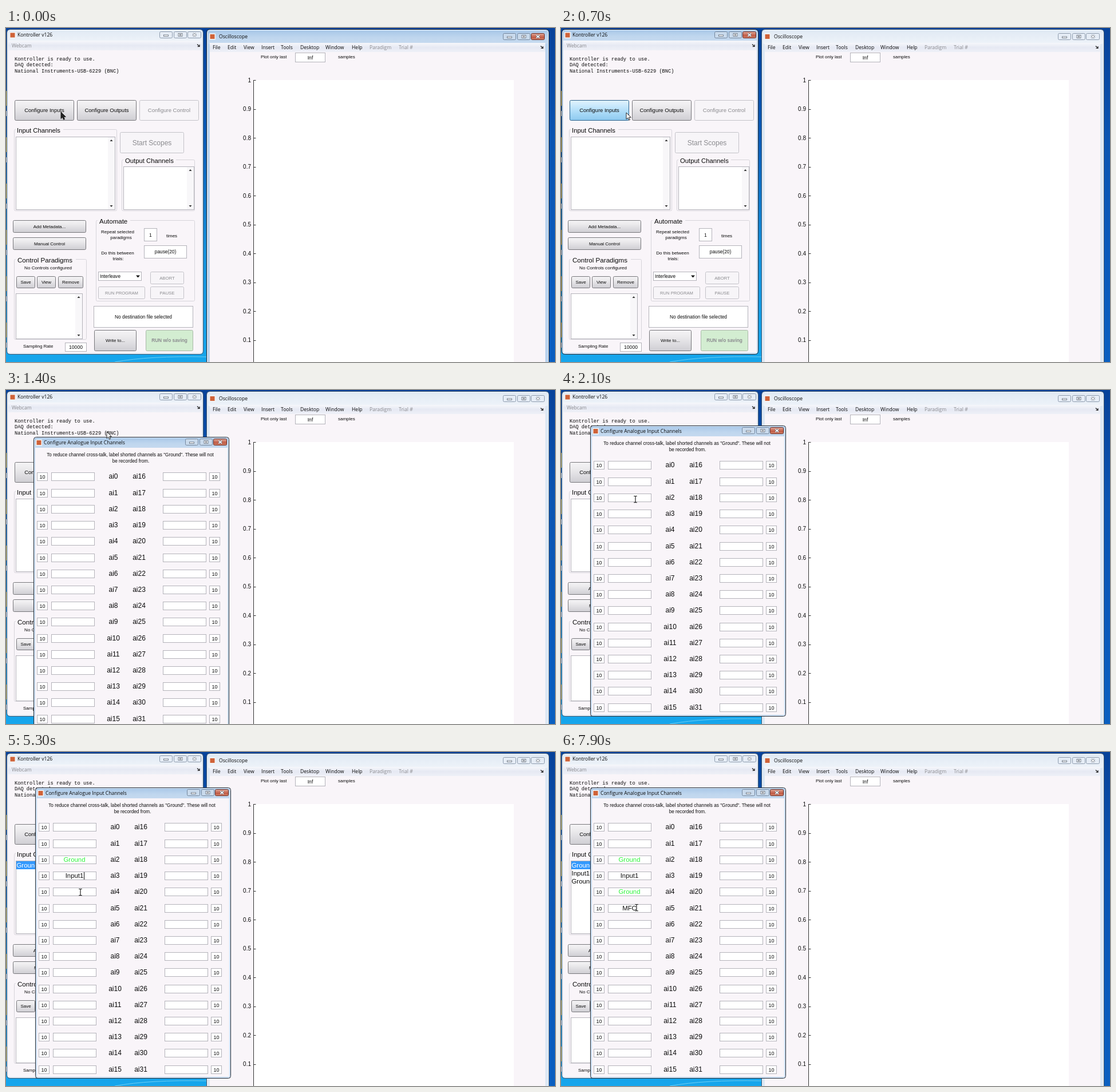
Recreate the animation shown at these times as an HTML page. Size 959 by 584 pixels, loop 8 s.

```html
<!DOCTYPE html>
<html lang="en">
<head>
<meta charset="utf-8">
<title>Kontroller</title>
<style>
html, body { margin: 0; width: 100%; height: 100%; overflow: hidden; background: #0a4fa9; }
svg { display: block; width: 959px; height: 584px; font-family: "Liberation Sans", Arial, sans-serif; }
text { fill: #0a0a0a; white-space: pre; }
.ui { font: 8.6px "Open Sans", "Noto Sans", sans-serif; }
.mono { font: 8.7px "Liberation Mono", monospace; }
.mid { text-anchor: middle; }
.off { fill: #8b8b8f; }
.body { fill: #f9f5f9; }
.edit { fill: #fff; stroke: #b4b3ba; }
.panel { fill: none; stroke: #d6d4da; }
.btn { fill: url(#gBtn); stroke: #77777b; }
.btn.dim { fill: #f7f5f8; stroke: #c3c2c8; }
.btn.go { fill: #d3edd1; stroke: #a9b9a8; }
.rim { fill: none; stroke: #3f566f; }
.on .rim { stroke: #1d2733; }
.frame { fill: #dde8f4; stroke: #eef4fa; }
.on .frame { fill: #b9d3ee; stroke: #e2effb; }
.bar { fill: url(#gIdle); }
.on .bar { fill: url(#gLive); }
.cap { fill: #e6edf6; stroke: #8d9bad; }
.on .cap { fill: #c9daec; stroke: #73869d; }
.on .close { fill: url(#gRed); stroke: #6d2a20; }
.glyph { fill: #fff; stroke: #596473; stroke-width: .8; }
.cross { fill: none; stroke: #fff; stroke-width: 1.4; }
.cross.edge { stroke: #596473; stroke-width: 2.8; }
#hot .btn { fill: url(#gHot); stroke: #2c628b; }
</style>
</head>
<body>
<svg id="stage" viewBox="0 0 959 584"></svg>
<script>
const LOOP = 8000, TICK = 100;
const stage = document.getElementById('stage');
const $ = id => document.getElementById(id);
const times = (n, f) => Array.from({ length: n }, (_, i) => f(i)).join('');

// Drawing helpers
const rect = (x, y, w, h, cls, extra = '') =>
  `<rect x="${x}" y="${y}" width="${w}" height="${h}" class="${cls}" ${extra}/>`;
const box = (x, y, w, h, cls, r = 0) => rect(x + .5, y + .5, w - 1, h - 1, cls, `rx="${r}"`);
const text = (x, y, s, size, cls = '', extra = '') =>
  `<text x="${x}" y="${y}" font-size="${size}" class="${cls}" ${extra}>${s}</text>`;
const mid = (x, y, s, size, cls = '', extra = '') => text(x, y, s, size, 'mid ' + cls, extra);
const button = (x, y, w, h, s, size = 8, cls = '', extra = '') =>
  box(x, y, w, h, 'btn ' + cls, 2) +
  mid(x + w / 2, y + h / 2 + size * .35, s, size, cls && 'off', extra);
const edit = (x, y, w, h, s = '', size = 8.2) =>
  box(x, y, w, h, 'edit') + mid(x + w / 2, y + h / 2 + size * .36, s, size);
const arrow = (x, y, d) => `<path d="M${x - 2.5} ${y + d}h5l-2.5 ${-3 * d}z" fill="#333"/>`;
const list = (x, y, w, h) =>
  box(x, y, w, h, 'edit') + rect(x + w - 13, y + 1, 12, h - 2, '', 'fill="#f8f7f9"') +
  arrow(x + w - 7, y + 7, 1) + arrow(x + w - 7, y + h - 7, -1);
const panel = (x, y, w, h, s, size, tw, dx = 5) =>
  box(x, y, w, h, 'panel', 2) + rect(x + 3, y - 4, tw + 5, 9, 'body') + text(x + dx, y + 6, s, size);
const dock = (x, y) =>
  `<path d="M${x - 2} ${y - 2}l3.5 3.5m.5-3v3.5h-3.5" fill="none" stroke="#222" stroke-width="1.2"/>`;

const caption = (x, y) => {
  const cross = `d="M${x + 58.5} ${y + 3.6}l5.5 4.8m0-4.8l-5.5 4.8"`;
  return box(x, y, 23, 12, 'cap', 2) + box(x + 25, y, 23, 12, 'cap', 2) + box(x + 49, y, 24, 12, 'cap close', 2) +
    rect(x + 7.5, y + 6, 8, 2.4, 'glyph') + rect(x + 33, y + 3.5, 7, 5, 'glyph') +
    rect(x + 35.2, y + 5.2, 2.6, 1.6, 'glyph') +
    `<path class="cross edge" ${cross}/><path class="cross" ${cross}/>`;
};
const shell = (x, y, w, h, r) => box(x + 1, y + 1, w - 2, h - 2, 'frame', r - 1) + box(x, y, w, h, 'rim', r);
const titleBar = (x, y, w, h, s, dx = 18) =>
  rect(x + 2, y + 2, w - 4, h, 'bar', 'rx="2"') +
  rect(x + 4, y + h / 2 - 5, 11, 11, '', 'fill="#f4f4f4"') +
  rect(x + 5.5, y + h / 2 - 3.5, 8, 8, '', 'fill="#cf6238"') +
  text(x + dx, y + h / 2 + 3.4, s, 8.6, 'ui');

const grad = (id, ...stops) =>
  `<linearGradient id="${id}" x2="0" y2="1">${stops.map((c, i) =>
    `<stop offset="${i / (stops.length - 1)}" stop-color="${c}"/>`).join('')}</linearGradient>`;

const defs = '<defs>' +
  grad('gBtn', '#f5f4f6', '#ebeaec', '#dddce0', '#cfced3') +
  grad('gHot', '#e2f3fd', '#c3e6fb', '#a6d8f6', '#8ec9ef') +
  grad('gIdle', '#e1eaf4', '#eef3f9') +
  grad('gLive', '#a9c8e8', '#bfd6ee', '#c6daef') +
  grad('gRed', '#e0b0a3', '#cf7a66', '#c05a44', '#d68c72') +
  grad('gMenu', '#f6f7fb', '#e6e9f3', '#eef0f7') +
  grad('gDesk', '#07429a', '#0b55b2', '#0a5abb', '#0a5fc0') +
  grad('gLeft', '#07429a', '#0b5cb8', '#1590da', '#16a6ec') + '</defs>';

const desktop =
  rect(0, 0, 959, 584, '', 'fill="url(#gDesk)"') +
  rect(0, 0, 352, 584, '', 'fill="url(#gLeft)"') +
  '<path d="M190 584Q250 573 350 575" fill="none" stroke="#6fd0f5"/>' +
  times(6, i => rect(0, 110 + i * 81, 2, 26, '', 'fill="#d9c56a"') + rect(0, 145 + i * 81, 2, 9, '', 'fill="#dfe9f4"'));

const menus = [[361, 'File'], [387, 'Edit'], [415, 'View'], [446, 'Insert'], [480, 'Tools'], [514, 'Desktop'],
  [558, 'Window'], [604, 'Help'], [635, 'Paradigm', 'off'], [686, 'Trial #', 'off']];

const scope = '<g id="scope">' +
  shell(350, 2, 599, 600, 5) + titleBar(351, 3, 597, 23, 'Oscilloscope', 21) +
  caption(868, 9) +
  rect(356, 26, 586, 16, '', 'fill="url(#gMenu)"') + rect(356, 42, 586, 560, 'body') +
  menus.map(([x, s, c = '']) => text(x, 36.8, s, 8.6, 'ui ' + c)).join('') + dock(936, 33.5) +
  text(445, 53.4, 'Plot only last', 8) + edit(505, 43, 53, 17, 'Inf', 8.6) + text(580, 53.4, 'samples', 8) +
  rect(432, 91, 455, 500, '', 'fill="#fff"') +
  '<path d="M432.5 91V584" stroke="#333"/>' +
  times(10, i => {
    const y = 91 + i * 50.5;
    return `<path d="M432 ${Math.round(y) + .5}h4.5" stroke="#333"/>` +
      text(428, y + 3.5, i ? (1 - i / 10).toFixed(1) : '1', 10, '', 'text-anchor="end"');
  }) + '</g>';

const kontroller = '<g id="main">' +
  shell(1, 2, 344, 569, 5) + titleBar(2, 2, 342, 20, 'Kontroller v126') + caption(268, 6) +
  rect(4, 22, 338, 17, '', 'fill="url(#gMenu)"') + rect(4, 39, 338, 529, 'body') +
  text(10, 34, 'Webcam', 8.6, 'ui off') + dock(336, 30.5) +
  ['Kontroller is ready to use.', 'DAQ detected:', 'National Instruments-USB-6229 (BNC)']
    .map((s, i) => text(15, 57 + i * 10.4, s, 8.7, 'mono')).join('') +
  '<g id="press">' + button(15, 126, 104, 36, 'Configure Inputs', 9.5) + '</g>' +
  button(124, 126, 104, 36, 'Configure Outputs', 9.5) +
  button(233, 126, 104, 36, 'Configure Control', 9.5, 'dim') +
  panel(14, 177, 180, 143, 'Input Channels', 11.3, 78) + list(17, 190, 174, 128) + '<g id="items"></g>' +
  button(199, 182, 112, 37, 'Start Scopes', 12, 'dim') +
  panel(202, 230, 128, 90, 'Output Channels', 11.3, 87, 6) + list(205, 242, 124, 76) +
  button(12, 336, 128, 22, 'Add Metadata...') + button(12, 366, 128, 22, 'Manual Control') +
  panel(157, 336, 173, 142, 'Automate', 11.5, 52, 6) +
  mid(195, 358.5, 'Repeat selected', 8) + mid(201, 369, 'paradigms', 8) +
  edit(241, 350, 23, 23, '1', 8.6) + text(280, 365.8, 'times', 8) +
  mid(195, 396, 'Do this between', 8) + mid(196, 406.3, 'trials:', 8) + edit(241, 380, 75, 23, 'pause(20)', 8.3) +
  box(161, 426, 76, 16, 'edit') + text(164, 437, 'Interleave', 8.2) + '<path d="M227 432.5h7l-3.5 4z" fill="#111"/>' +
  button(252, 426, 59, 22, 'ABORT', 7.8, 'dim') +
  button(161, 452, 82, 22, 'RUN PROGRAM', 7.6, 'dim') + button(252, 452, 59, 22, 'PAUSE', 7.8, 'dim') +
  panel(14, 404, 127, 141, 'Control Paradigms', 11.6, 100, 6) +
  mid(73.5, 422.3, 'No Controls configured', 8.1) +
  button(18, 434, 33, 21, 'Save') + button(54, 434, 33, 21, 'View') + button(91, 434, 44, 21, 'Remove') +
  list(17, 464, 117, 80) +
  edit(153, 486, 174, 38, 'No destination file selected', 8.4) +
  text(30, 558.5, 'Sampling Rate', 8) + edit(103, 550, 38, 16, '10000', 8.6) +
  button(154, 528, 74, 37, 'Write to...') +
  button(244, 528, 83, 37, 'RUN w/o saving', 8.3, 'go', 'font-weight="bold"') + '</g>';

const rowY = i => Math.round(69.4 + i * 28.22);
const dialog = '<g id="dialog" class="on">' +
  shell(0, 0, 342, 509, 4) + titleBar(0, 0, 342, 19, 'Configure Analogue Input Channels') + caption(265, 3) +
  rect(3, 19, 336, 487, 'body') +
  mid(169, 34.4, 'To reduce channel cross-talk, label shorted channels as "Ground". These will not', 8.2) +
  mid(170, 45, 'be recorded from.', 8.2) +
  times(16, i => {
    const y = rowY(i) - 7, base = y + 11.4;
    return edit(6, y, 19, 15, '10', 9) + edit(31, y, 76, 15) +
      mid(139.5, base, 'ai' + i, 12) + mid(184.5, base, 'ai' + (16 + i), 12) +
      edit(226, y, 76, 15) + edit(307, y, 19, 15, '10', 9);
  }) + '<g id="typed"></g><path id="caret" stroke="#111"/></g>';

const pointers =
  '<path id="hand" d="M0 0V11.5L2.7 9L4.6 13.2L6.5 12.4L4.6 8.3H8.3Z" stroke="#111" stroke-width=".9"/>' +
  '<path id="beam" d="M-2.8 -5.5H-.9L0 -4.8L.9 -5.5H2.8M0 -4.8V5M-2.8 5.7H-.9L0 5L.9 5.7H2.8" fill="none" stroke="#111" stroke-width="1.1"/>';

stage.innerHTML = defs + desktop + scope + kontroller + dialog + pointers;

// Timeline, all times in ms
const HOVER = 200, FOCUS = 300, OPEN = 800, BEAM = 1900;
const pointerPath = [[0, 96, 147], [400, 97, 149], [600, 97, 149], [900, 163, 146], [1000, 165, 135], [1500, 177, 66],
  [1700, 177, 67], [2100, 130, 191], [3200, 130, 193], [3700, 130, 193], [4000, 130, 217], [4900, 130, 217],
  [5200, 130, 245], [6500, 130, 245], [6900, 132, 272], [LOOP, 132, 272]];
const dialogPath = [[0, 40, 141], [1000, 40, 141], [1600, 51, 62], [LOOP, 51, 62]];
const entries = [
  { row: 2, word: 'Ground', click: 2200, type: 2500, step: 100, done: 3200 },
  { row: 3, word: 'Input1', click: 4100, type: 4400, step: 100, done: 5500 },
  { row: 4, word: 'Ground', click: 5500, type: 5800, step: 100, done: 7000 },
  { row: 5, word: 'MFC', click: 7000, type: 7300, step: 150, done: LOOP }
];

function at(path, t) {
  const i = Math.max(1, path.findIndex(p => p[0] > t));
  const [a, b] = [path[i - 1], path[i]];
  const k = (t - a[0]) / (b[0] - a[0]), e = k * k * (3 - 2 * k);
  return [a[1] + (b[1] - a[1]) * e, a[2] + (b[2] - a[2]) * e];
}
const show = (el, on) => el.setAttribute('visibility', on ? 'visible' : 'hidden');
const place = (el, [x, y]) => el.setAttribute('transform', `translate(${Math.round(x)} ${Math.round(y)})`);

$('typed').innerHTML = entries.map(e => mid(68.5, rowY(e.row) + 4.4, '', 11.4)).join('');
const words = [...$('typed').children];

$('items').innerHTML = entries.slice(0, 3).map((e, i) =>
  '<g>' + (i ? '' : rect(18, 191, 160, 14, '', 'fill="#3399ff"')) +
  text(18.5, 201.7 + i * 14.3, e.word, 11.4, '', i ? '' : 'style="fill:#fff"') + '</g>').join('');
const items = [...$('items').children];

function render(t) {
  $('scope').classList.toggle('on', t < FOCUS);
  $('main').classList.toggle('on', t >= FOCUS && t < OPEN);
  const hot = t >= HOVER && t < OPEN;
  const press = $('press') || $('hot');
  press.id = hot ? 'hot' : 'press';

  show($('dialog'), t >= OPEN);
  place($('dialog'), at(dialogPath, t));

  let caret = '';
  entries.forEach((e, i) => {
    const n = t < e.type ? 0 : Math.floor((t - e.type) / e.step) + 1;
    const done = t >= e.done, el = words[i];
    el.textContent = e.word.slice(0, n);
    el.style.fill = done && e.word === 'Ground' ? '#2cf53a' : '#111';
    const blink = (t - e.click) % 1000 < 500 || n < e.word.length;
    if (t >= e.click && !done && blink) {
      const x = Math.round(69 + el.getComputedTextLength() / 2) + .5;
      caret = `M${x} ${rowY(e.row) - 6}v13`;
    }
    if (items[i]) show(items[i], done);
  });
  $('caret').setAttribute('d', caret);

  const p = at(pointerPath, t);
  place($('hand'), p);
  place($('beam'), p);
  $('hand').setAttribute('fill', t < HOVER ? '#222' : '#fff');
  show($('hand'), t < BEAM);
  show($('beam'), t >= BEAM);
}

function loop() {
  const t = performance.now() % LOOP;
  render(Math.floor(t / TICK) * TICK);
  requestAnimationFrame(loop);
}
loop();
</script>
</body>
</html>
```
